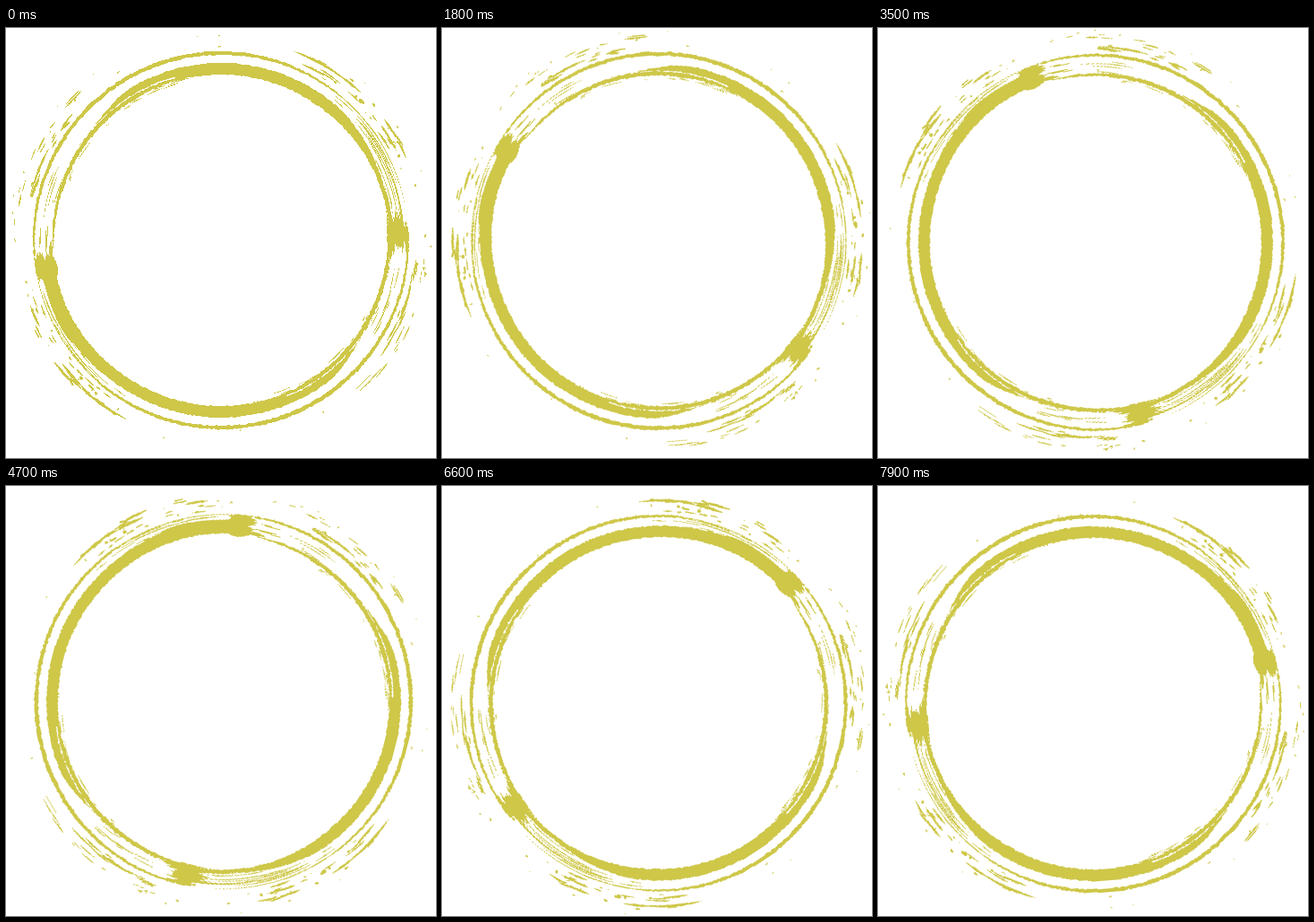
Animation of 480x480 px, one loop 8 s. Source, as an HTML page:

```html
<!DOCTYPE html>
<html lang="en">
<head>
<meta charset="utf-8">
<title>Turning brush ring</title>
<style>
  html, body { margin: 0; width: 100%; height: 100%; overflow: hidden; background: #fff; }
  svg { display: block; width: 100vw; height: 100vh; }
  #ring {
    fill: #cec748;
    shape-rendering: crispEdges;
    transform-origin: 240px 240px;
    animation: turn 8s steps(80) infinite;
  }
  @keyframes turn {
    from { transform: rotate(0deg); }
    to { transform: rotate(177.6deg); }
  }
</style>
</head>
<body>
<svg viewBox="0 0 480 480"><path id="ring"/></svg>
<script>
// The ring sits slightly above the pivot, so it wobbles as it turns.
const CX = 240, CY = 237;
let seed = 41;
const rand = () => (seed = (seed * 16807) % 2147483647) / 2147483647;
const between = (a, b) => a + (b - a) * rand();
const parts = [];

// Eases from 0 at a to 1 at b; a may be the larger one.
function ease(a, b, x) {
  const t = Math.min(1, Math.max(0, (x - a) / (b - a)));
  return t * t * (3 - 2 * t);
}

const arch = (t, power) => Math.max(0, Math.sin(Math.PI * t)) ** power;

function point(deg, r) {
  const a = deg * Math.PI / 180;
  return (CX + r * Math.cos(a)).toFixed(2) + ' ' + (CY + r * Math.sin(a)).toFixed(2);
}

// Rough ribbon; edges(t) gives its inner and outer radius along the way.
function band(start, len, rough, edges) {
  const inner = [], outer = [];
  const n = Math.max(4, Math.ceil(len / 0.7));
  for (let i = 0; i <= n; i++) {
    const a = start + len * i / n;
    const [r0, r1] = edges(i / n);
    inner.unshift(point(a, r0 + between(-rough, rough)));
    outer.push(point(a, r1 + between(-rough, rough)));
  }
  parts.push('M' + outer.concat(inner).join('L') + 'Z');
}

// Tapered stroke along the circle.
function streak(start, len, r, width, drift = 0, power = 0.7) {
  band(start, len, width * 0.15, t => {
    const half = width / 2 * arch(t, power) + 0.1;
    const mid = r + drift * t;
    return [mid - half, mid + half];
  });
}

function cluster(count, a0, a1, r0, r1, maxLen, maxWidth) {
  for (let i = 0; i < count; i++) {
    const len = maxLen * (0.15 + 0.85 * rand() ** 2);
    streak(between(a0, a1 - len), len, between(r0, r1),
      maxWidth * between(0.4, 1), between(-0.8, 0.8));
  }
}

// Main sweep up to a tip; swell widens or thins its last stretch.
function sweep(tip, swell) {
  const len = 146;
  band(tip - len, len, 0.6, t => {
    const left = len * (1 - t);
    return [
      190 - 5 * ease(108, 98, left) + 3 * ease(60, 5, left),
      190 + 8 * ease(140, 118, left) + swell * ease(50, 16, left)
    ];
  });
}

// One half of the ring: outer line, sweep, inner strand, tip and bristles.
function half(tip, swell) {
  streak(tip - 2, 142, 209, 4.2, 0, 0.5);
  streak(tip + 120, 56, 209, 0.8);
  sweep(tip, swell);
  streak(tip - 182, 90, 187.5, 4.6, -1, 0.6);

  // Jagged tip, spiking both ways.
  for (let r = 188; r <= 208; r += 2.5) {
    const back = between(4, 9);
    streak(tip - back, back + between(2, 6), r - 1, 4.2, 1);
  }
  streak(tip - 2, 10, 190, 4);

  cluster(14, tip - 55, tip - 2, 198, 209, 26, 1.3);
  cluster(12, tip - 30, tip - 2, 192, 204, 18, 1.5);
  cluster(10, tip, tip + 34, 187, 203, 14, 1.2);
  cluster(18, tip + 28, tip + 88, 181, 185, 9, 1.1);
}

// Broken strokes outside the ring, ahead of a tip's path.
function spray(start) {
  streak(start, 15, 226, 2.6, 1);
  cluster(14, start, start + 48, 224, 231, 9, 2.8);
  cluster(14, start + 2, start + 48, 213, 221, 8, 2.2);
  cluster(6, start + 3, start + 46, 214, 222, 3, 4.5);
}

function lightSpray(start) {
  streak(start + 8, 12, 218, 2.4);
  cluster(14, start, start + 34, 214, 221, 10, 2);
  cluster(12, start - 4, start + 46, 224, 232, 9, 1.4);
}

half(-1, -6);
half(172, 4);
spray(-69);
spray(118);
lightSpray(5);
lightSpray(188);
cluster(40, 0, 360, 213, 238, 1.2, 1.8);

document.getElementById('ring').setAttribute('d', parts.join(''));
</script>
</body>
</html>
```
